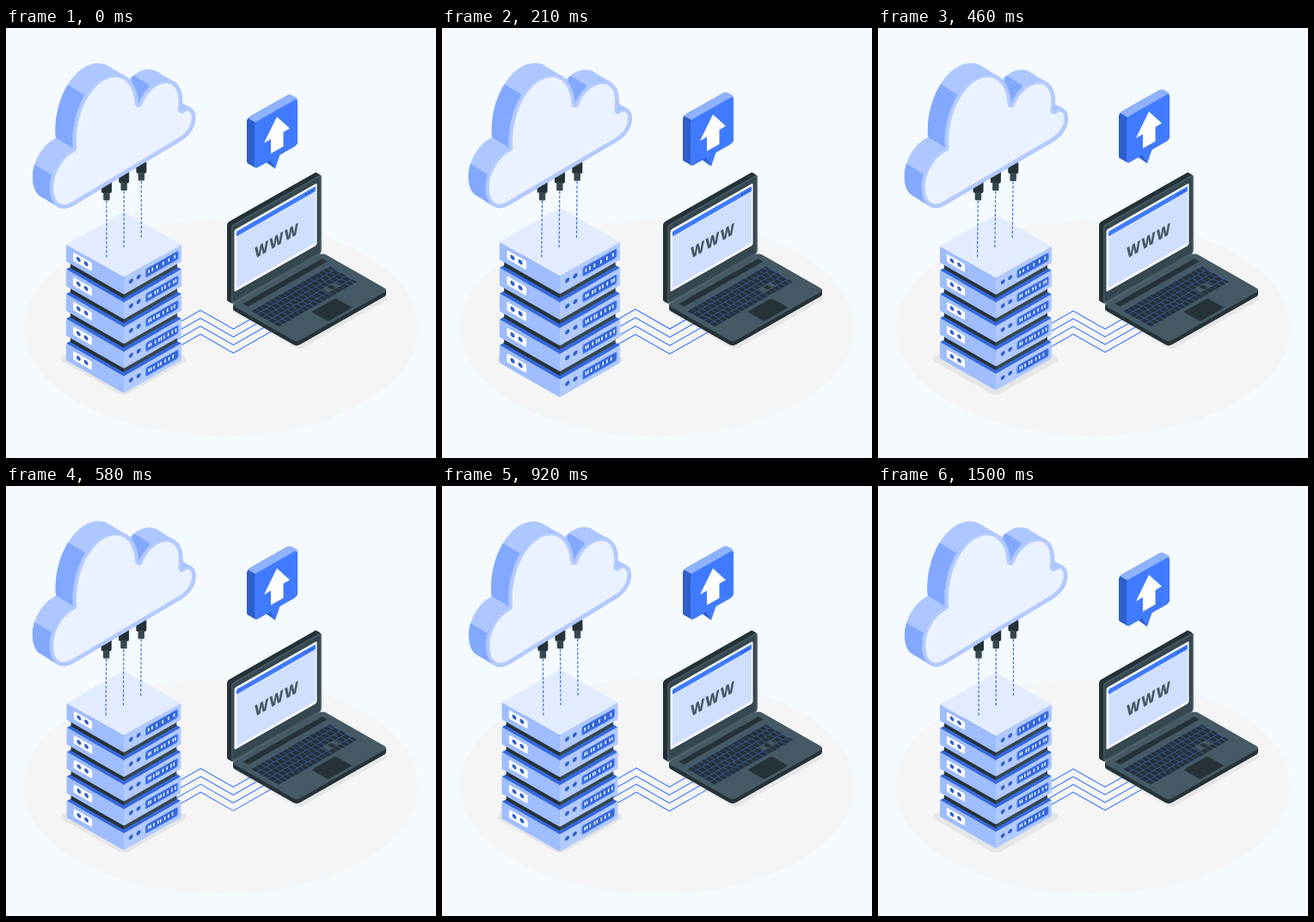
An HTML page with a canvas that plays this animation: 500x500 px, repeating every 1.54 s.

```html
<!DOCTYPE html>
<html lang="en">
<head>
<meta charset="utf-8">
<title>Cloud hosting</title>
<style>
html, body { margin: 0; width: 100%; height: 100%; overflow: hidden; background: #f5faff; }
canvas { display: block; width: 500px; height: 500px; }
</style>
</head>
<body>
<canvas id="stage" width="500" height="500"></canvas>
<script>
const ctx = document.getElementById('stage').getContext('2d');
const LOOP = 1540;
const ISO = 0.57;
const BLUE = '#407bff', NAVY = '#2f60cc', SKY = '#aec7ff', MID = '#82a8ff';
const INK = '#263238', SLATE = '#37474f', STEEL = '#455a64';
ctx.lineJoin = 'round';

function rect(x, y, w, h, fill, radius = 0) {
  ctx.beginPath();
  ctx.roundRect(x, y, w, h, radius);
  ctx.fillStyle = fill;
  ctx.fill();
}

function triangleShape(x, y, w, h, lean, fill) {
  ctx.beginPath();
  ctx.moveTo(x, y);
  ctx.lineTo(x + w, y);
  ctx.lineTo(x + lean, y + h);
  ctx.fillStyle = fill;
  ctx.fill();
}

function dot(x, y, r, fill) {
  ctx.beginPath();
  ctx.arc(x, y, r, 0, Math.PI * 2);
  ctx.fillStyle = fill;
  ctx.fill();
}

function within(draw, ...matrix) {
  ctx.save();
  ctx.transform(...matrix);
  draw();
  ctx.restore();
}

// A wall is sheared vertically; a floor runs right-up along x and right-down along y.
const wall = (x, y, slope, draw) => within(draw, 1, slope, 0, 1, x, y);
const floor = (x, y, draw) => within(draw, 1, -ISO, 1, ISO, x, y);

function group(draw, x, y, scale, angle = 0) {
  const c = scale * Math.cos(angle), s = scale * Math.sin(angle);
  within(draw, c, s, -s, c, x - c * x + s * y, y - s * x - c * y);
}

// Calls draw with offsets running from (dx, dy) back to the front face.
function extrude(dx, dy, draw) {
  const steps = 2 * Math.ceil(Math.hypot(dx, dy));
  for (let i = steps; i >= 0; i--) draw(dx * i / steps, dy * i / steps);
}

function randomFrom(seed) {
  return () => {
    seed = (seed * 16807) % 2147483647;
    return seed / 2147483647;
  };
}

function ground() {
  ctx.fillStyle = '#f5faff';
  ctx.fillRect(0, 0, 500, 500);
  ctx.beginPath();
  ctx.ellipse(250, 349, 229.5, 125.3, 0, 0, Math.PI * 2);
  ctx.fillStyle = '#f5f5f5';
  ctx.fill();
  floor(61, 385, () => rect(0, 0, 76, 76, '#e6e6e6', 6));
  floor(265, 331, () => rect(0, 0, 105, 76, '#e6e6e6', 5));
}

function wires() {
  ctx.strokeStyle = BLUE;
  ctx.lineWidth = 1.1;
  for (let i = 0; i < 4; i++) {
    const peak = 329 + 9 * i;
    ctx.beginPath();
    ctx.moveTo(180, peak + 47 * ISO);
    ctx.lineTo(227, peak);
    ctx.lineTo(264, peak + 37 * ISO);
    ctx.lineTo(320, peak - 19 * ISO);
    ctx.stroke();
  }
}

function indicators(row) {
  const random = randomFrom(row * 977 + 41);
  rect(24.5, 4.5, 37, 10, BLUE, 2);
  rect(25.7, 5.3, 34.6, 7.8, '#3466d6', 1.5);
  const gap = row ? 2.2 : 4;
  for (let x = 27.5; x < 59; x += gap + random() * 3) rect(x, 7.3, 1.4, 3.9, '#fff');
}

function server(y, row) {
  const side = 65, h = 19;
  floor(72, y, () => rect(0, 0, side, side, row ? '#3569dc' : '#e3ecff', 1));
  wall(72, y, ISO, () => {
    rect(0, 0, side, h, '#9fbdff', 1);
    rect(8, 4, 21, 9.5, '#fff', 1.5);
    for (const x of [14, 22.5]) dot(x, 8.6, 2.4, NAVY);
  });
  wall(137, y + side * ISO, -ISO, () => {
    rect(0, 0, side, h, '#b3caff', 1);
    for (const x of [8.2, 16.7]) dot(x, 8.7, 2.4, NAVY);
    indicators(row);
  });
}

function stack() {
  for (let row = 4; row >= 0; row--) {
    const y = 254 + row * 27.8;
    server(y, row);
    if (row) {
      wall(77, y - 12, ISO, () => rect(0, 0, 60, 10.5, INK));
      wall(137, y + 22, -ISO, () => rect(0, 0, 60, 10.5, SLATE));
    }
  }
}

function keyboard() {
  const rowHeight = 6.5;
  rect(5, 17.5, 92, 5 * rowHeight, '#3c5fa6', 1);
  for (let row = 0; row < 5; row++) {
    const keyWidth = 5.2 + (row % 2) * 0.5;
    for (let x = 5.4; x < 96; x += keyWidth) {
      rect(x, 17.9 + row * rowHeight, Math.min(keyWidth - 0.7, 96.6 - x), rowHeight - 0.7, INK);
    }
  }
  rect(69, 36.5, 14, 13.5, STEEL);
  rect(74, 37.5, 4.5, 5.5, INK);
  for (let i = 0; i < 3; i++) rect(69.5 + i * 4.6, 44, 4, 5.5, INK);
}

function screen() {
  rect(0, 0, 104.5, 92, STEEL, 3);
  rect(1.5, 2, 101.5, 88, SLATE, 2);
  rect(3.5, 7.5, 96, 72, '#fff', 2);
  rect(6, 10.4, 92, 6, BLUE, 1);
  rect(6, 17, 92, 59.5, '#d1dfff', 1);
  for (let i = 0; i < 3; i++) dot(87 + i * 3.5, 13.3, 1.1, '#2b4fa0');
}

function laptop() {
  extrude(0, 5, (dx, dy) => floor(262 + dx, 322 + dy, () => rect(0, 0, 106, 76, INK, 4)));
  floor(262, 322, () => {
    rect(0, 0, 106, 76, STEEL, 4);
    rect(8, 5.5, 92, 6, INK);
    keyboard();
    rect(39.5, 53.5, 28, 19.5, INK, 1.5);
  });
  extrude(-5, -3, (dx, dy) => wall(262 + dx, 229.5 + dy, -ISO, () => rect(0, 0, 104.5, 92, INK, 3)));
  wall(262, 229.5, -ISO, screen);
  within(() => {
    ctx.font = '800 18px "Open Sans", "Noto Sans", sans-serif';
    ctx.letterSpacing = '1.3px';
    ctx.textAlign = 'center';
    ctx.fillStyle = STEEL;
    ctx.fillText('WWW', 0, 0);
  }, 0.87, -0.5, 0, 1, 315, 253.5);
}

const cloudFront = new Path2D(`M66 209.5 C55 208 51 198 51 185 C51 167 63 147 78 140
  C74 98 98 53 127 53 C143 53 153 68 154 88 C160 72 173 60 186 60
  C201 60 207 75 204 95 C212 88 220 94 220 104 C220 115 213 125 203 131
  L82 204 C76 208 71 210 66 209.5 Z`);
const cloudBody = new Path2D();
extrude(-20, -12, (dx, dy) => cloudBody.addPath(cloudFront, new DOMMatrix([1, 0, 0, 1, dx, dy])));

function cloudSide() {
  ctx.save();
  ctx.clip(cloudBody);
  ctx.fillStyle = SKY;
  ctx.fillRect(20, 30, 210, 190);
  wall(50, 53, 0.6, () => rect(0, 0, 42, 70, MID));
  wall(20, 151, 0.6, () => rect(0, 0, 50, 60, MID));
  wall(146, 53.6, 0.6, () => rect(0, 0, 20, 40, MID));
  ctx.restore();
}

function cable(x, y) {
  rect(x - 6, y - 22, 12, 14, INK, 2);
  rect(x - 3.7, y - 9, 7.4, 9.5, SLATE, 1.2);
  ctx.setLineDash([3.3, 1.9]);
  ctx.beginPath();
  ctx.moveTo(x, y + 1);
  ctx.lineTo(x, y + 67);
  ctx.strokeStyle = '#3f6fe0';
  ctx.lineWidth = 1.2;
  ctx.stroke();
  ctx.setLineDash([]);
}

function cloud() {
  for (let i = 0; i < 3; i++) cable(117 + i * 20.2, 200 - i * 11.5);
  cloudSide();
  ctx.fillStyle = '#ebf2ff';
  ctx.fill(cloudFront);
  ctx.save();
  ctx.clip(cloudFront);
  ctx.lineWidth = 8.5;
  ctx.strokeStyle = '#b4cbff';
  ctx.stroke(cloudFront);
  ctx.restore();
  ctx.lineWidth = 0.6;
  ctx.strokeStyle = '#8fb1ff';
  ctx.stroke(cloudFront);
}

function bubble() {
  const w = 50, h = 54;
  extrude(-9, -5, (dx, dy) => wall(289 + dx, 110 + dy, -ISO, () => rect(0, 0, w, h, NAVY, 4)));
  floor(280, 105, () => rect(1, 0, w - 1, 9.5, '#8fb2ff', [2, 2, 0, 0]));
  wall(289, 110, -ISO, () => {
    triangleShape(13, 53, 10, 14, 11, NAVY);
    triangleShape(18, 53, 12, 14, 6, BLUE);
    rect(0, 0, w, h, BLUE, 4);
    triangleShape(11, 30, 30, -22, 15, '#fff');
    rect(19, 29.5, 14.5, 17.3, '#fff');
  });
}

// Triangle wave: 0 at the start, 1 at half a turn, back to 0.
const triangleWave = turn => 1 - Math.abs(1 - 2 * (turn % 1));

function beat(t) {
  const pulse = peak => Math.max(0, 1 - Math.abs(t - peak) / 245);
  return 1 + 0.098 * (pulse(163) + pulse(770));
}

const startTime = performance.now();

function render() {
  const t = (performance.now() - startTime) % LOOP;
  const turn = (t + 20) / LOOP;
  const scale = beat(t);
  const sway = 2 * triangleWave(turn + 0.25) - 1;
  ground();
  group(wires, 253, 353, scale);
  group(stack, 137, 318, scale);
  laptop();
  group(cloud, 126, 153, 1, sway * Math.PI / 180);
  within(bubble, 1, 0, 0, 1, 0, 0.4 - 10 * triangleWave(turn));
  requestAnimationFrame(render);
}
render();
</script>
</body>
</html>
```
